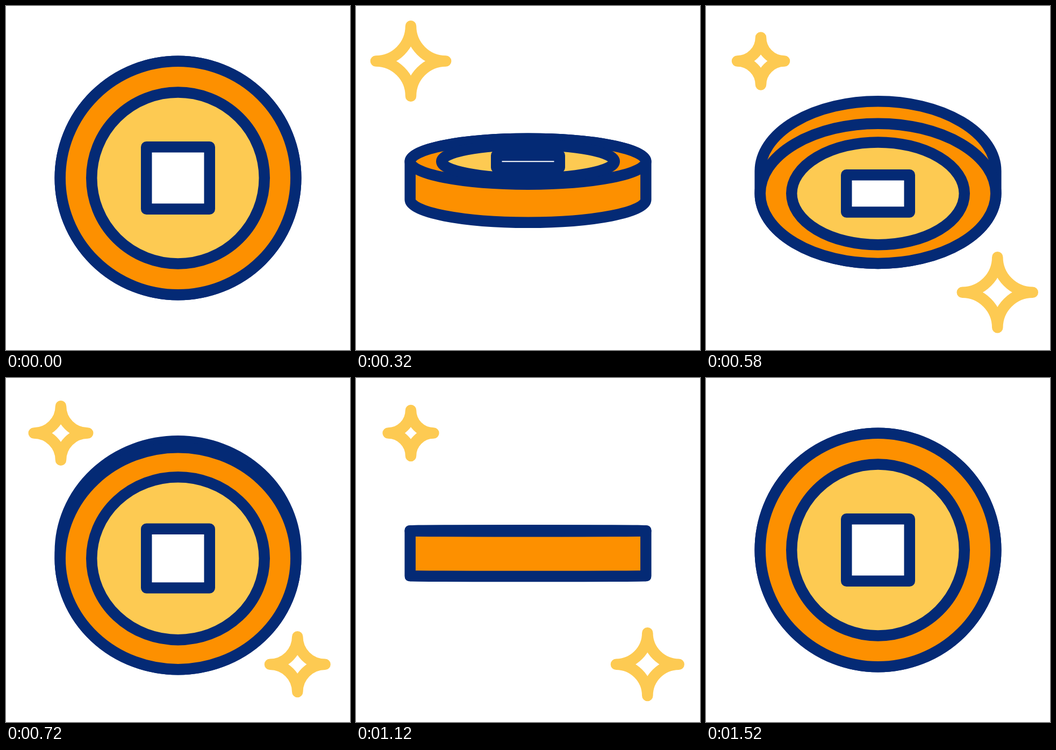
Animation of 640 by 640 pixels, one loop 1.9 s. Source, as an HTML page with a canvas:

```html
<!DOCTYPE html>
<html lang="en">
<head>
<meta charset="utf-8">
<title>Spinning coin</title>
<style>
  html, body { margin: 0; height: 100%; overflow: hidden; background: #fff; }
  canvas { display: block; width: 100vw; height: 100vh; }
</style>
</head>
<body>
<canvas id="stage" width="640" height="640"></canvas>
<script>
const ctx = document.getElementById('stage').getContext('2d');
const LOOP = 1900, STEP = 20, LINE = 20.5, CX = 320;
const NAVY = '#042a75', ORANGE = '#fd9000', YELLOW = '#fdca52';

// [ms, value] tables
const TILT = [[0, 1], [200, .596], [378, 0], [440, -.167], [720, -.95], [765, -1],
  [960, -.5844], [1121, 0], [1280, .577], [1487, 1]];
const DEPTH = [[0, 0], [378, -42], [720, -6], [765, 0], [960, 22.5], [1121, 42],
  [1280, 22.25], [1487, 0]];
const MIDDLE = [[0, 320], [200, 323.1], [440, 326.5], [720, 329.7], [765, 330.3],
  [960, 328.25], [1280, 324.25], [1487, 320]];
const TWINKLE = [[72, 0], [200, 41.7], [278, 67], [440, 52.5], [575, 44], [715, 50],
  [960, 64], [1015, 65.7], [1050, 67], [1080, 57.7], [1255, 0]];
const STARS = [{ x: 102, y: 102.5, delay: 0 }, { x: 542.3, y: 532.7, delay: 265 }];

function segment(keys, t) {
  let i = 0;
  while (i < keys.length - 2 && t > keys[i + 1][0]) i++;
  return i;
}

function linear(keys, t) {
  const i = segment(keys, t), [t0, a] = keys[i], [t1, b] = keys[i + 1];
  return a + (b - a) * Math.min(1, Math.max(0, (t - t0) / (t1 - t0)));
}

// Monotone cubic: smooth, without overshoot at the turning points
function smooth(keys, t) {
  const slope = i => (keys[i + 1][1] - keys[i][1]) / (keys[i + 1][0] - keys[i][0]);
  const tangent = i => {
    if (i === 0 || i === keys.length - 1) return 0;
    const a = slope(i - 1), b = slope(i);
    return a * b > 0 ? 2 * a * b / (a + b) : 0;
  };
  const i = segment(keys, t), [t0, a] = keys[i], [t1, b] = keys[i + 1], d = t1 - t0;
  const s = Math.min(1, Math.max(0, (t - t0) / d)), r = 1 - s;
  return a * (1 + 2 * s) * r * r + b * s * s * (3 - 2 * s)
    + d * s * r * (tangent(i) * r - tangent(i + 1) * s);
}

function paint(fill, stroke = NAVY) {
  if (fill) {
    ctx.fillStyle = fill;
    ctx.fill();
  }
  ctx.strokeStyle = stroke;
  ctx.stroke();
}

function oval(y, rx, ry, fill) {
  ctx.beginPath();
  ctx.ellipse(CX, y, rx, ry, 0, 0, 2 * Math.PI);
  paint(fill);
}

function drawCoin(t) {
  const c = smooth(TILT, t), k = Math.abs(c);
  const h = linear(DEPTH, t), mid = linear(MIDDLE, t);
  const y = mid + (c > 0 ? h : -h), ry = 217.3 * k;

  // Rim
  ctx.beginPath();
  ctx.ellipse(CX, mid - Math.abs(h), 219.3, ry, 0, Math.PI, 2 * Math.PI);
  ctx.ellipse(CX, mid + Math.abs(h), 219.3, ry, 0, 0, Math.PI);
  ctx.closePath();
  paint(ORANGE);

  // Face
  oval(y, 219.3, ry, ORANGE);
  oval(y, 160.75, 159.4 * k, YELLOW);

  // Hole
  const w = 58.75, half = 57.8 * k;
  ctx.beginPath();
  ctx.rect(CX - w, y - half, 2 * w, 2 * half);
  paint('#fff');
  if (t > 765 && t < 1121) {
    const edge = Math.min(y + half, y - half + 1.81 * h);
    ctx.beginPath();
    ctx.moveTo(CX - w, edge);
    ctx.lineTo(CX + w, edge);
    paint();
  }
}

function drawStar({ x, y, delay }, t) {
  const r = smooth(TWINKLE, t - delay);
  if (r < .5) return;
  const q = Math.PI / 2;
  ctx.beginPath();
  ctx.arc(x + r, y - r, r, 2 * q, q, true);
  ctx.arc(x + r, y + r, r, 3 * q, 2 * q, true);
  ctx.arc(x - r, y + r, r, 0, -q, true);
  ctx.arc(x - r, y - r, r, q, 0, true);
  ctx.closePath();
  paint(null, YELLOW);
}

function draw(now) {
  const t = Math.floor((now % LOOP) / STEP) * STEP;
  ctx.fillStyle = '#fff';
  ctx.fillRect(0, 0, 640, 640);
  ctx.lineWidth = LINE;
  ctx.lineJoin = ctx.lineCap = 'round';
  drawCoin(t);
  STARS.forEach(star => drawStar(star, t));
}

const start = performance.now();
function tick() {
  draw(performance.now() - start);
  requestAnimationFrame(tick);
}
tick();
</script>
</body>
</html>
```
